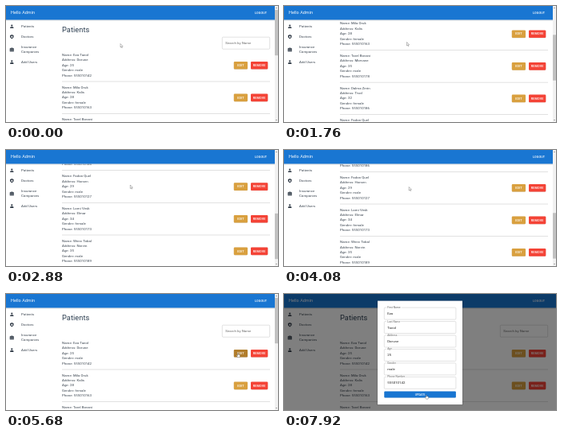
An HTML page with a canvas that plays this animation: 340x146 px, repeating every 8000 ms.

```html
<!DOCTYPE html>
<html lang="en">
<head>
<meta charset="utf-8">
<title>Patients</title>
<style>
html, body { margin: 0; width: 100%; height: 100%; overflow: hidden; background: #fff; }
canvas { display: block; width: 340px; height: 146px; }
</style>
</head>
<body>
<canvas id="stage"></canvas>
<script>
const W = 340, H = 146, LOOP = 8000;
const BODY = 4.35, LINE = 6.4, PITCH = 40.6, BAR = 17.4;
const INK = '#36404c', BLUE = '#1976d2';
const canvas = document.getElementById('stage');
const ctx = canvas.getContext('2d');
const dpr = window.devicePixelRatio || 1;
canvas.width = W * dpr;
canvas.height = H * dpr;

const patients = [
  ['Ezo Tanid', 'Dorune', 25, 'male', '555010142'],
  ['Mila Oruk', 'Kalis', 28, 'female', '555010163'],
  ['Tarel Bovani', 'Morvane', 35, 'male', '555010178'],
  ['Dalma Zerin', 'Tivol', 32, 'female', '555010186'],
  ['Fadon Quel', 'Harsen', 29, 'male', '555010127'],
  ['Lomi Vesk', 'Elmar', 34, 'female', '555010173'],
  ['Wenn Tobal', 'Norvin', 35, 'male', '555010189']
];
const labels = ['Name', 'Address', 'Age', 'Gender', 'Phone'];
const form = [
  ['First Name', 'Ezo'], ['Last Name', 'Tanid'], ['Address', 'Dorune'],
  ['Age', '25'], ['Gender', 'male'], ['Phone Number', '555010142']
];

// Key rows: time, then values
const scrollKeys = [[0, 0], [320, 0], [1760, 80], [2800, 191], [4000, 191], [4080, 189.6], [4960, 0]];
const pointerKeys = [
  [0, 143, 47.5], [1760, 153.5, 45.5], [2880, 155.3, 44], [4080, 156.2, 46.5], [4960, 157, 47],
  [5560, 290, 74.5], [5900, 290, 74.5], [6240, 246, 84.5], [7080, 178, 127]
];

const clamp = v => Math.max(0, Math.min(1, v));
const smooth = p => p * p * (3 - 2 * p);

function at(keys, t, ease = p => p) {
  let i = 0;
  while (i < keys.length - 2 && t >= keys[i + 1][0]) i++;
  const a = keys[i], b = keys[i + 1];
  const p = ease(clamp((t - a[0]) / (b[0] - a[0])));
  return a.slice(1).map((v, k) => v + (b[k + 1] - v) * p);
}

// y is the middle of the line; a large font scaled down keeps exact advances
function text(str, x, y, size = BODY, color = INK, weight = 400, align = 'left', spacing = 0.009) {
  const k = 16;
  ctx.save();
  ctx.translate(x, y + size * 0.31);
  ctx.scale(1 / k, 1 / k);
  ctx.font = `${weight} ${size * k}px Roboto, Arial, sans-serif`;
  ctx.letterSpacing = `${size * k * spacing}px`;
  ctx.textAlign = align;
  ctx.fillStyle = color;
  ctx.fillText(str, 0, 0);
  ctx.restore();
}

function rect(x, y, w, h, color) {
  ctx.fillStyle = color;
  ctx.fillRect(x, y, w, h);
}

function box(x, y, w, h, r, fill, stroke) {
  ctx.beginPath();
  ctx.roundRect(x, y, w, h, r);
  if (fill) { ctx.fillStyle = fill; ctx.fill(); }
  if (stroke) { ctx.strokeStyle = stroke; ctx.lineWidth = 0.4; ctx.stroke(); }
}

function poly(points, fill, stroke) {
  ctx.beginPath();
  points.forEach(([x, y]) => ctx.lineTo(x, y));
  ctx.closePath();
  ctx.fillStyle = fill;
  ctx.fill();
  if (stroke) { ctx.strokeStyle = stroke; ctx.lineWidth = 0.3; ctx.stroke(); }
}

function button(label, x, y, w, h, color, size = 3.8) {
  box(x, y + 0.3, w, h, 1.1, 'rgba(0,0,0,.12)');
  box(x, y, w, h, 1.1, color);
  text(label, x + w / 2, y + h / 2, size, '#fff', 500, 'center', 0.028);
}

function person(x, y) {
  ctx.fillStyle = INK;
  ctx.beginPath();
  ctx.arc(x, y - 1.2, 1.15, 0, 7);
  ctx.fill();
  box(x - 2.2, y + 0.5, 4.4, 1.8, [1.4, 1.4, 0, 0], INK);
}

function shield(x, y) {
  poly([[x, y - 2.8], [x + 2.3, y - 1.8], [x + 2.2, y + 0.6], [x, y + 2.8], [x - 2.2, y + 0.6], [x - 2.3, y - 1.8]], INK);
  rect(x - 1.2, y - 0.4, 2.4, 0.8, '#fff');
  rect(x - 0.4, y - 1.2, 0.8, 2.4, '#fff');
}

function briefcase(x, y) {
  box(x - 1.1, y - 2.3, 2.2, 1.6, 0.3, null, INK);
  box(x - 2.6, y - 1.5, 5.2, 4, 0.5, INK);
  rect(x - 2.6, y + 0.4, 5.2, 0.4, '#fff');
}

function sidebar() {
  person(7.3, 25.8);
  shield(7.3, 38.8);
  briefcase(7.3, 54.8);
  person(7.3, 70.6);
  [['Patients', 25.8], ['Doctors', 38.8], ['Insurance', 51.6], ['Companies', 57.8], ['Add Users', 70.6]]
    .forEach(([s, y]) => text(s, 19, y));
}

function page(scroll, editHover) {
  ctx.save();
  ctx.beginPath();
  ctx.rect(60, BAR, 276, H - BAR);
  ctx.clip();
  ctx.translate(0, -scroll);
  text('Patients', 70, 29.8, 9.25, '#2c3e50', 400, 'left', 0.007);
  box(270.3, 39.2, 59.4, 15, 1.1, null, '#b4b4b4');
  text('Search by Name', 274.3, 46.9, BODY, '#666');
  patients.forEach((data, i) => {
    const y = 61.6 + i * PITCH;
    labels.forEach((label, j) => text(`${label}: ${data[j]}`, 70, y + j * LINE));
    button('EDIT', 284.8, y + 8.3, 17.2, 9.7, i === 0 && editHover ? '#b17d2b' : '#d9a03f');
    button('REMOVE', 306, y + 8.3, 21.3, 9.7, '#f44336');
    rect(70, y + 33.2, 260, 0.4, '#b4b4b4');
  });
  ctx.restore();
}

function appBar() {
  const g = ctx.createLinearGradient(0, BAR, 0, BAR + 1.6);
  g.addColorStop(0, 'rgba(0,0,0,.2)');
  g.addColorStop(1, 'rgba(0,0,0,0)');
  rect(0, BAR, W, 1.6, g);
  rect(0, 0, W, BAR, BLUE);
  text('Hello Admin', 6, 8.8, 5.44, '#fff');
  text('LOGOUT', 311, 8.8, 3.8, '#fff', 500, 'left', 0.028);
}

function scrollbar(scroll) {
  rect(336, 0, 4, H, '#f1f1f1');
  rect(336, 4.8 + scroll * 0.393, 4, 57.4, '#c1c1c1');
  poly([[337, 3], [338, 1.7], [339, 3]], '#777');
  poly([[337, 143], [338, 144.3], [339, 143]], '#777');
}

function modal(alpha, hover) {
  ctx.save();
  ctx.globalAlpha = alpha;
  rect(0, 0, W, H, 'rgba(0,0,0,.5)');
  rect(116.4, 8.6, 107.2, 131.6, 'rgba(0,0,0,.2)');
  rect(117, 8.6, 106, 130.6, '#fff');
  form.forEach(([label, value], i) => {
    const y = 17.1 + i * 17.45;
    box(125.3, y, 89.6, 15, 1.1, null, '#b8b8b8');
    rect(128, y - 0.6, label.length * 1.72 + 2, 1.2, '#fff');
    text(label, 129.2, y, 3.26, '#666');
    text(value, 129.2, y + 7.7, BODY, '#222');
  });
  button('UPDATE', 125.3, 122.5, 89.6, 8, hover ? BLUE : '#2196f3', 3.3);
  ctx.restore();
}

function arrow(x, y) {
  poly([[x, y], [x, y + 4.5], [x + 1, y + 3.6], [x + 1.7, y + 5.1], [x + 2.4, y + 4.8],
    [x + 1.8, y + 3.3], [x + 3.1, y + 3.2]], '#fff', '#222');
}

function hand(x, y) {
  poly([[x - 0.4, y], [x + 0.4, y], [x + 0.5, y + 1.8], [x + 2.6, y + 2.2], [x + 2.6, y + 3.8],
    [x + 2, y + 5.2], [x - 0.4, y + 5.2], [x - 1.9, y + 3], [x - 1.4, y + 2.5], [x - 0.4, y + 3.1]], '#fff', '#222');
}

function draw(t) {
  const [scroll] = at(scrollKeys, t);
  const [x, y] = at(pointerKeys, t, smooth);
  const fade = smooth(clamp((t - 5880) / 225));
  const onEdit = t < 5980 && x > 284.7 && y > 69;
  const onUpdate = t > 6240 && y > 122.5;

  ctx.setTransform(dpr, 0, 0, dpr, 0, 0);
  rect(0, 0, W, H, '#fff');
  sidebar();
  page(scroll, onEdit);
  appBar();
  if (fade === 0) scrollbar(scroll);
  else modal(fade, onUpdate);
  (onEdit || onUpdate ? hand : arrow)(x, y);
}

const start = performance.now();
function tick() {
  draw((performance.now() - start) % LOOP);
  requestAnimationFrame(tick);
}
tick();
</script>
</body>
</html>
```
